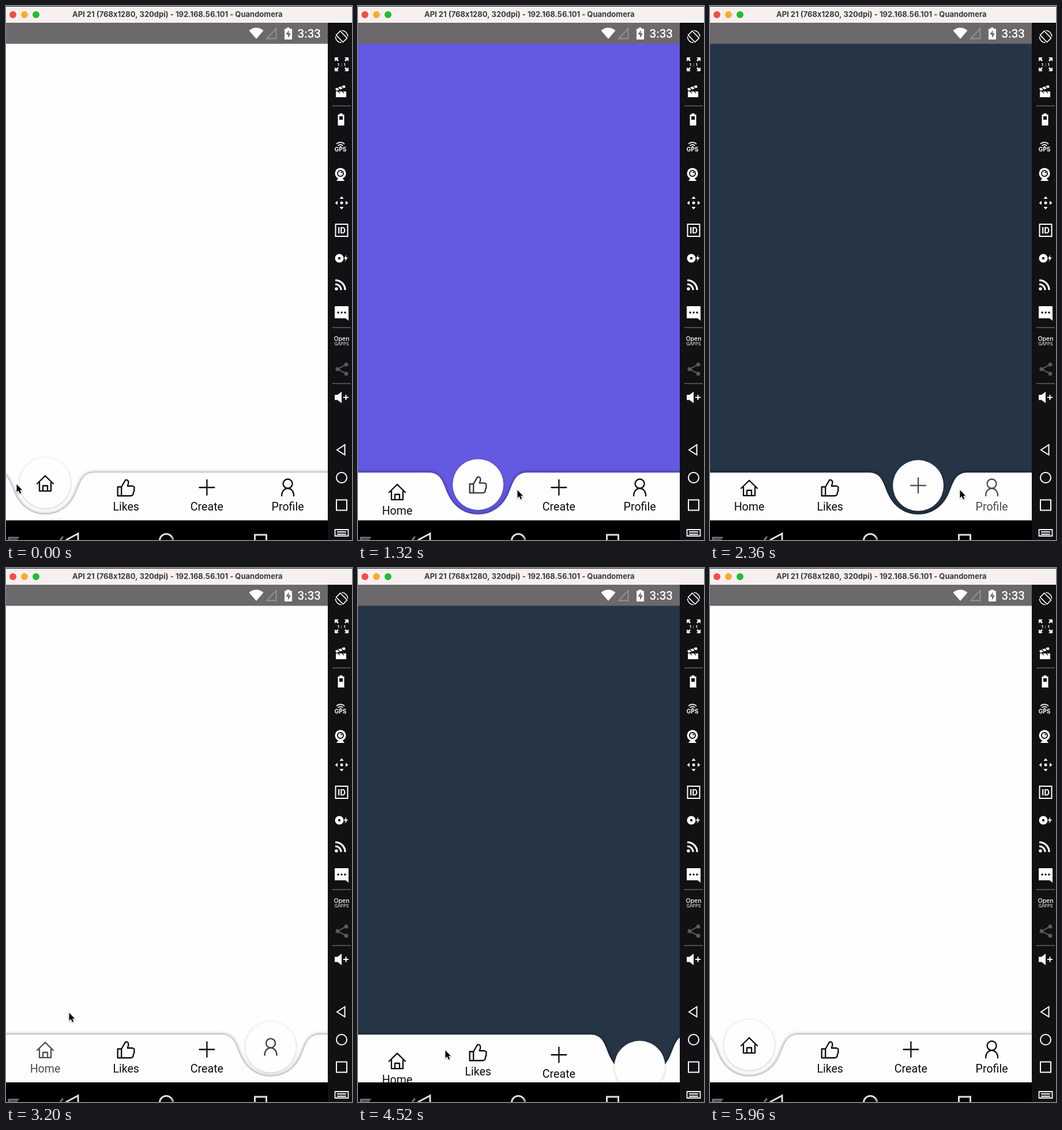
Animation, 600 px wide and 925 px high, one loop 6.28 s. Source, as an HTML page with a canvas:

```html
<!DOCTYPE html>
<html lang="en">
<head>
<meta charset="utf-8">
<title>Curved tab bar</title>
<style>
html, body { margin: 0; width: 100%; height: 100%; overflow: hidden; background: #000; }
canvas { display: block; width: 600px; height: 925px; }
</style>
</head>
<body>
<canvas id="stage" width="600" height="925"></canvas>
<script>
const ctx = document.getElementById('stage').getContext('2d');
const LOOP = 6280, STEP = 40, LAST = 5960;
const WHITE = '#fefdff', INK = '#0b0a0c';
const BAR = { top: 808.2, bottom: 891, right: 558 };
const TABS = ['Home', 'Likes', 'Create', 'Profile'];
const tabX = i => 68 + 140.2 * i;

// Bubble travel: slides sideways while sinking, then rises at the new tab.
const SLIDE = 480, RISE = 200, DEPTH = 51, REST = 826;
const moves = [
  { t: 674, from: 0, to: 1 },
  { t: 1500, from: 1, to: 2 },
  { t: 2258, from: 2, to: 3 },
  { t: 3110, from: 3, to: 0 },
  { t: 3966, from: 0, to: 3 },
  { t: 4986, from: 3, to: 0 }
];
const pages = [[0, WHITE], [1154, '#6459e1'], [1980, '#253546'], [2738, WHITE], [4446, '#253546'], [4600, WHITE]];
const presses = [[674, 1], [1500, 2], [2258, 3], [3110, 0], [3966, 2], [4130, 3], [4986, 0]];
const pointer = [
  [0, 18, 828], [600, 160, 838], [760, 170, 839], [1320, 276, 838], [1560, 300, 839],
  [2200, 432, 838], [2360, 433, 838], [3060, 110, 772], [3200, 109, 770], [3400, 110, 772],
  [3920, 300, 836], [4130, 430, 838], [4520, 151, 835], [4880, 92, 830], [5000, 94, 826],
  [5240, 343, 315], [5840, 400, -22]
];

const clamp = v => Math.max(0, Math.min(1, v));
const ease = p => (p = clamp(p), p < .5 ? 2 * p * p : 1 - 2 * (1 - p) ** 2);
const slideTime = p => SLIDE * (p < .5 ? Math.sqrt(p / 2) : 1 - Math.sqrt((1 - p) / 2));

function bubbleAt(t) {
  const m = moves.filter(m => m.t <= t).pop();
  if (!m) return { x: tabX(0), dip: 0, icon: 0 };
  const age = t - m.t, p = ease(age / SLIDE);
  const dip = DEPTH * (age < SLIDE ? p : 1 - ease((age - SLIDE) / RISE));
  return { x: tabX(m.from + (m.to - m.from) * p), dip, icon: age < SLIDE / 2 ? m.from : m.to };
}

function tabOffset(i, t) {
  const m = moves.filter(m => m.t <= t).pop();
  if (!m) return i === 0 ? 70 : 0;
  const age = t - m.t;
  if (i === m.to) return 70 * ease((age - 280) / 200);
  if (i === m.from) return 70 * (1 - clamp((age - 300) / 450)) ** 1.57;
  const p = (i - m.from) / (m.to - m.from);
  if (p < 0 || p > 1) return 0;
  const since = age - slideTime(p);
  return since < 100 ? 18 * clamp(since / 100) : 18 * (1 - clamp((since - 100) / 350));
}

function tabAlpha(i, t) {
  return presses.reduce((a, [at, tab]) => {
    if (tab !== i || t < at - 60 || t > at + 240) return a;
    return 1 - .27 * Math.min(1, (t - at + 60) / 40, (at + 240 - t) / 80);
  }, 1);
}

function pointerAt(t) {
  const k = pointer.findIndex(p => p[0] > t);
  if (k < 0) return null;
  const [t0, x0, y0] = pointer[k - 1], [t1, x1, y1] = pointer[k];
  const p = ease((t - t0) / (t1 - t0));
  return [x0 + (x1 - x0) * p, y0 + (y1 - y0) * p];
}

// Drawing helpers
function rect(x, y, w, h, color) { ctx.fillStyle = color; ctx.fillRect(x, y, w, h); }
function disc(x, y, r, color) {
  ctx.fillStyle = color;
  ctx.beginPath(); ctx.arc(x, y, r, 0, 7); ctx.fill();
}
function fill(d, color = '#fff') { ctx.fillStyle = color; ctx.fill(new Path2D(d), 'evenodd'); }
function line(d, width = 2, color = '#fff') {
  ctx.strokeStyle = color; ctx.lineWidth = width; ctx.stroke(new Path2D(d));
}
function text(s, x, y, font, color = '#fff', align = 'center') {
  ctx.font = font; ctx.fillStyle = color; ctx.textAlign = align; ctx.fillText(s, x, y);
}
function at(x, y, draw) { ctx.save(); ctx.translate(x, y); draw(); ctx.restore(); }
function shadow(alpha, blur, dy) {
  ctx.shadowColor = `rgba(0,0,0,${alpha})`; ctx.shadowBlur = blur; ctx.shadowOffsetY = dy;
}

const tabIcons = [
  'M-14 1.500L0 -12.300L14 1.500M-10 -1V14.200H-4V5H4V14.200H10V-1M-4 14.200H4',
  'M-14.5 -1H-8V14.5H-14.5ZM-8 -1L-1 -13Q5 -14 4 -7L2.5 -2.5H11Q16 -1 13.8 3Q15 6 12.8 8Q13 14.5 8 14.5H-8',
  'M-13 0H13M0 -13V13',
  'M8 -6.500A8 8 0 1 1 -8 -6.500A8 8 0 1 1 8 -6.500M-10.5 14.500C-10.5 6 -5 1.5 0 1.5C5 1.5 10.5 6 10.5 14.500'
];
function tabIcon(i, x, y) {
  ctx.lineJoin = 'round'; ctx.lineCap = 'round';
  at(x, y, () => line(tabIcons[i], 2.3, INK));
  ctx.lineJoin = 'miter'; ctx.lineCap = 'butt';
}

function titleBar() {
  rect(0, 0, 600, 29, '#f7f0f1');
  rect(0, 0, 600, 1, '#19171a');
  disc(12, 15, 6, '#fb4b47'); disc(32, 15, 6, '#fdac28'); disc(52, 15, 6, '#22bd35');
  text('API 21 (768x1280, 320dpi) - 192.168.56.101 - Quandomera', 115, 19,
    '700 13px Inter, sans-serif', '#3b393b', 'left');
}

function statusBar() {
  rect(0, 29, 558, 36.5, '#6b696c');
  fill('M434 57L421.500 42.500Q434 32.500 446.500 42.500Z');
  line('M468.500 39V56.500H452Z', 1.8, '#969497');
  fill('M486.500 37.500H492V39.500H496V58H483V39.500H486.500ZM490.500 41.500L485.500 49.500H489V55.500L494 47.500H490.500Z');
  text('3:33', 546, 55, '500 20.5px Roboto, sans-serif', '#fff', 'right');
}

function navKeys() {
  rect(0, 891, 558, 34, '#000');
  line('M22 921H5V925M5 925H20', 3, '#77757a');
  line('M99 919L94 925', 3, '#77757a');
  line('M125 925V914L104 925', 3, '#dedde0');
  line('M266.500 926A11.500 11.500 0 0 1 289.500 926', 3, '#dedde0');
  line('M285 919L290 925', 2, '#77757a');
  line('M431.500 926V916H451.500V926', 3, '#dedde0');
}

function sidebar() {
  rect(558, 29, 42, 896, '#111013');
  for (const y of [173, 557, 654]) rect(566, y - .5, 32, 1, '#8b8a8d');

  at(582, 53, () => {
    ctx.rotate(-Math.PI / 4);
    line('M-5 -8.500H5V8.500H-5Z', 1.6);
    line('M7.500 -7.500A10.600 10.600 0 0 1 7.500 7.500M-7.500 7.500A10.600 10.600 0 0 1 -7.500 -7.500', 1.4);
  });
  at(582, 101, () => {
    for (let i = 0; i < 4; i++) {
      ctx.rotate(Math.PI / 2);
      fill('M-12 -12H-5L-7.500 -9.500L-5 -7L-7 -5L-9.500 -7.500L-12 -5Z');
    }
    text('1 : 1', 0, 3, '700 8px Roboto, sans-serif');
  });
  at(581, 148, () => {
    fill('M-9 0H9V10H-9Z');
    fill('M-10 -5L6 -11L8 -7L-8 -1Z');
    line('M-6 -7L-2 -3M0 -9L4 -5M-5 0L-2 3M2 0L5 3', 1.3, '#111013');
  });
  at(581, 196, () => fill('M-2.500 -10H2.500V-8H5.500V11H-5.500V-8H-2.500ZM-3 -5V1H3V-5Z'));
  at(580, 243, () => {
    line('M-7 -4A10 10 0 0 1 7 -4M-4.500 -1A6.500 6.500 0 0 1 4.500 -1', 1.7);
    disc(0, 1, 1.5, '#fff');
    text('GPS', 0, 9, '700 10px Inter, sans-serif');
  });
  at(580, 292, () => {
    disc(0, -2, 9.5, '#fff'); disc(0, -2, 6, '#111013'); disc(0, -2, 4, '#fff'); disc(1.5, -3.5, 1.3, '#111013');
    fill('M-4 7H4L7 11H-7Z');
  });
  at(582, 341, () => {
    disc(0, 0, 2.5, '#fff');
    for (let i = 0; i < 4; i++) { ctx.rotate(Math.PI / 2); fill('M0 -11.500L3.500 -7H-3.500Z'); }
  });
  at(582, 388.5, () => {
    line('M-10.500 -10.500H10.500V10.500H-10.500Z', 2);
    text('ID', 0, 5.5, '700 15px Roboto, sans-serif');
  });
  at(578, 437, () => {
    disc(0, 0, 7.5, '#fff'); disc(0, 0, 2.2, '#111013');
    fill('M12 -6L8 1H11L9.500 6L15 -1.500H11.500Z');
  });
  at(571, 492, () => {
    disc(2, -2, 2.7, '#fff');
    line('M0 -10A10 10 0 0 1 10 0M0 -17A17 17 0 0 1 17 0', 3.2);
  });
  at(582, 532, () => {
    fill('M-12 -12H12V13L7 9H-12Z');
    for (const x of [-6, 0, 6]) disc(x, -1, 1.8, '#111013');
  });
  text('Open', 582, 580, '500 10.5px Inter, sans-serif');
  text('GAPPS', 582, 588, '400 7.5px Inter, sans-serif');
  at(582, 629, () => {
    line('M8 -8L-7 0L8 8', 2, '#59585b');
    for (const [x, y] of [[8, -8], [-7, 0], [8, 8]]) disc(x, y, 3.5, '#59585b');
  });
  at(582, 678, () => {
    fill('M-12 -4.500H-7L0 -10V10L-7 4.500H-12Z');
    line('M3 0H12M7.500 -4.500V4.500', 2);
  });
  line('M587.500 760V777.500L574 769Z', 2);
  line('M591 817A9 9 0 1 1 573 817A9 9 0 1 1 591 817', 2);
  line('M573 855.500H591V873.500H573Z', 2);
  line('M570.500 907H593.500V918H570.500ZM574 911H590M574 915H590', 1.8);
}

function barPath(c) {
  const y = BAR.top, p = new Path2D();
  p.moveTo(-120, y);
  p.lineTo(c - 85, y);
  p.bezierCurveTo(c - 62, y, c - 60, y + 22, c - 52, y + 38);
  p.bezierCurveTo(c - 42, y + 60, c - 22, y + 72.5, c, y + 72.5);
  p.bezierCurveTo(c + 22, y + 72.5, c + 42, y + 60, c + 52, y + 38);
  p.bezierCurveTo(c + 60, y + 22, c + 62, y, c + 85, y);
  p.lineTo(700, y);
  p.lineTo(700, 940);
  p.lineTo(-120, 940);
  p.closePath();
  return p;
}

function app(t) {
  const b = bubbleAt(t), y = REST + b.dip;
  ctx.save();
  ctx.beginPath(); ctx.rect(0, 65, BAR.right, BAR.bottom - 65); ctx.clip();
  rect(0, 65, 558, 826, pages.filter(p => p[0] <= t).pop()[1]);

  ctx.save();
  shadow(.55, 6, 0);
  ctx.fillStyle = WHITE;
  ctx.fill(barPath(b.x));
  ctx.restore();

  TABS.forEach((name, i) => {
    const dy = tabOffset(i, t);
    if (dy > 56) return;
    ctx.globalAlpha = tabAlpha(i, t);
    tabIcon(i, tabX(i), 834 + dy);
    text(name, tabX(i), 874 + dy, '400 19.6px Roboto, sans-serif', INK);
    ctx.globalAlpha = 1;
  });

  ctx.save();
  shadow(.22, 4, 1);
  disc(b.x, y, 44, WHITE);
  ctx.restore();
  ctx.globalAlpha = clamp(1 - b.dip / 18);
  tabIcon(b.icon, b.x, y);
  ctx.restore();
}

function cursor(t) {
  const p = pointerAt(t);
  if (!p) return;
  at(p[0], p[1], () => {
    const d = 'M.5 .5V14L3.600 11.200L6 16.500L8.300 15.500L6 10.400H10.200Z';
    ctx.save();
    shadow(.3, 2, 1);
    line(d, 2, '#fff');
    ctx.restore();
    fill(d, '#000');
  });
}

function draw(t) {
  ctx.clearRect(0, 0, 600, 925);
  app(t);
  statusBar();
  navKeys();
  sidebar();
  titleBar();
  cursor(t);
}

const start = performance.now();
function tick() {
  const t = (performance.now() - start) % LOOP;
  draw(Math.min(LAST, Math.floor(t / STEP) * STEP));
  requestAnimationFrame(tick);
}
tick();
</script>
</body>
</html>
```
